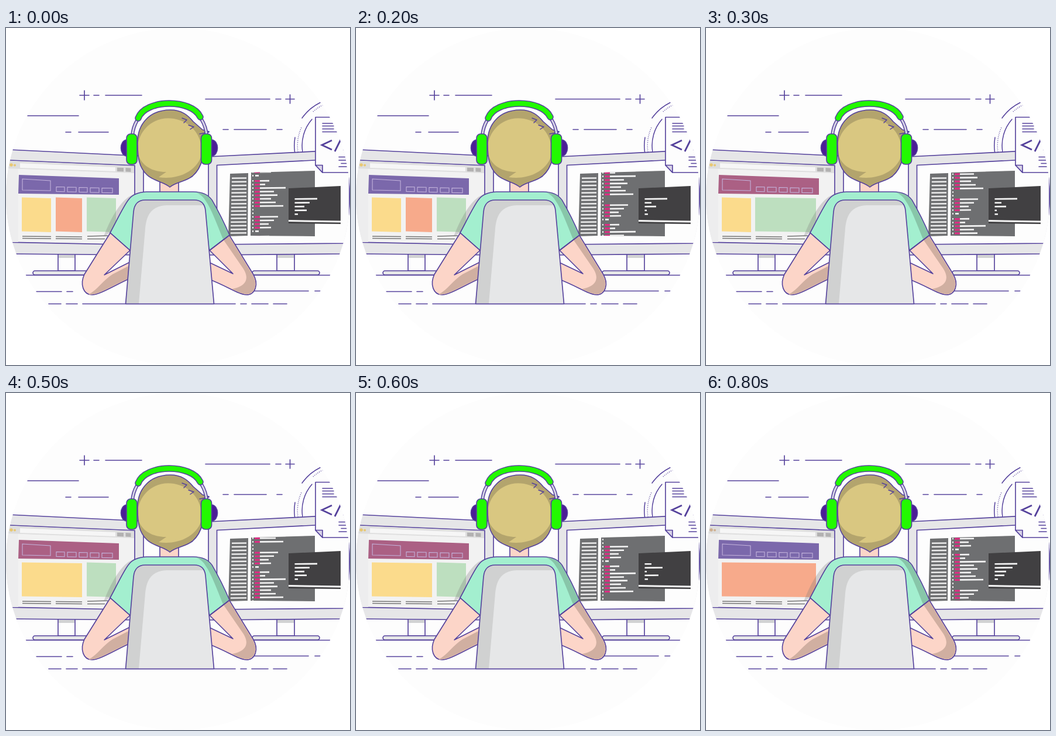
An HTML page that plays this animation: 588x576 px, repeating every 0.9 s.

```html
<!DOCTYPE html>
<html lang="en">
<head>
<meta charset="utf-8">
<title>Coding at two screens</title>
<style>
html, body { margin: 0; width: 100%; height: 100%; overflow: hidden; background: #fff; }
svg { display: block; width: 588px; height: 576px; }
.ink { stroke: #55429c; stroke-width: 1.65; stroke-linejoin: round; stroke-linecap: round; }
.open { fill: none; }
</style>
</head>
<body>
<svg viewBox="0 0 588 576">
  <defs>
    <path id="hair" d="M225 200C223 162 248 140 281 140C300 140 311 149 320 160L336 174L347 177L338 184C339 214 337 237 319 253C307 263 290 263 280 272C271 263 252 262 241 251C227 238 225 220 225 200Z"/>
    <path id="chair" d="M204.500 471.500L218 314Q220 294 238 294H322Q339 294 341 312L355.500 471.500Z"/>
    <path id="wires" d="M224 158Q217 170 216 184M334 156Q342 169 343 184"/>
    <path id="band" d="M226 154C238 121 318 121 332 152"/>
    <clipPath id="stage"><ellipse cx="294" cy="288" rx="294" ry="288"/></clipPath>
    <clipPath id="editor"><path d="M419 247L528 244V356L418 355Z"/></clipPath>
    <clipPath id="head"><use href="#hair"/></clipPath>
  </defs>
  <g clip-path="url(#stage)">
    <rect width="588" height="576" fill="#fdfdfd"/>

    <!-- background dashes -->
    <path class="ink open" d="M126 115h16M134 107v16M150 115h9M170 115h62M341 121.500h110M461 121.500h9M478 121.500h15M485.500 114v15
      M37 150h87M102 178h9M124 178h51M371 173.500h9M390 173.500h55M463 173.500h9
      M34 422.500h106M420 422.500h134M52 450.500h43M104 450.500h10M424 449.500h93M528 449.500h9
      M73 471.500h21M103 471.500h19M131 471.500h261M401 471.500h10M420 471.500h28M457 471.500h23"/>

    <!-- dial behind the document -->
    <g class="ink open" style="stroke-width:1.500">
      <path d="M506 154A82 82 0 0 1 537 127.500M507 212A68 68 0 0 1 523 156M493.500 212A82 82 0 0 1 494 187"/>
      <path d="M525 143A76 76 0 0 1 543 131M499 212A76 76 0 0 1 505 170" stroke-dasharray="1 2.200" stroke-linecap="butt"/>
    </g>

    <!-- left monitor -->
    <g class="ink">
      <path d="M89 386h29v29h-29z" fill="#fdfdfd"/>
      <rect x="46" y="415" width="99" height="7" rx="3.500" fill="#e6e7e8"/>
      <path d="M-5 207.500L235 219V388L-5 386Z" fill="#e6e6e8"/>
      <path d="M-5 225.500L220 235V370.500L-5 366Z" fill="#f2f2f2"/>
    </g>
    <path d="M90 388h27v5h-27z" fill="#d1d2d3"/>
    <path d="M0 227L21 228V366H0Z" fill="#ededee"/>
    <path d="M0 227L219 236V248L0 240Z" fill="#dedede"/>
    <path d="M24 231L187 238V245L24 239Z" fill="#f6f6f6"/>
    <path d="M190 238.500l11 .5v6.500l-11-.5zM204.500 239l9 .4v6.500l-9-.4z" fill="#b2b1b1"/>
    <g id="tabs"><circle cx="9" cy="234" r="2.800"/><circle cx="15" cy="234.500" r="2"/></g>
    <path id="banner" d="M22 251L193 257V285L21 283Z"/>
    <path d="M28 258L76 261V278L28 277ZM86 271.500l14 .3v8l-14-.4zM105 272l15 .3v8l-15-.4zM125 272.500l14 .3v8l-14-.4zM144 273l15 .3v8l-15-.4zM164 273.500l18 .3v8l-18-.4z"
      fill="none" stroke="#c4b3dc" stroke-width="1.100"/>
    <g id="cards"></g>
    <path d="M28 356l49 .5M28 359.500l49 .5M85 356.500l45 .5M85 360l45 .5M139 356l35-1M139 360.500h30" stroke="#777" stroke-width="1.500"/>

    <!-- right monitor -->
    <g class="ink">
      <path d="M463 386h30v29h-30z" fill="#fdfdfd"/>
      <rect x="421" y="415" width="115" height="7" rx="3.500" fill="#e6e7e8"/>
      <path d="M346 220L587 208V386L346 388Z" fill="#e6e6e8"/>
      <path d="M360.500 234.500L587 223V368L360.500 370Z" fill="#fdfdfd"/>
    </g>
    <path d="M464 388h28v5h-28z" fill="#d1d2d3"/>
    <path d="M383 249L414 248L413 355L380 356ZM419 247L528 244V356L418 355Z" fill="#6e6f71"/>
    <g id="sidebar" fill="#ececec"></g>
    <g clip-path="url(#editor)"><g id="code"></g></g>
    <path d="M483 274L572 270V335L483 334Z" fill="#414042"/>
    <path d="M483 329.500L572 331" stroke="#f5f5f5" stroke-width="3"/>
    <g id="terminal" fill="#f5f5f5"></g>

    <!-- document -->
    <g class="ink">
      <path d="M529 152.500H610V247H541L529 234.500Z" fill="#fdfdfd"/>
      <path d="M529 234.500H541V247Z" fill="#d9d4e8"/>
      <path class="open" style="stroke-width:1.500" d="M541 163h19M541 167.500h19M541 172.500h19M541 177.500h25M569 220.500h12M569 226h12M573 231.500h9M569 237h13"/>
      <path class="open" style="stroke-width:2.800;stroke-linecap:butt;stroke-linejoin:miter" d="M557 192L540 200L557 208M562 211L572.500 190"/>
    </g>

    <!-- person -->
    <path d="M167 356Q183 314 203 294Q215 282 235 281L205 302L178 350Z" fill="#777" opacity=".28"/>
    <path class="ink" d="M263 258H295V284H263Z" fill="#fcd5c8"/>

    <g class="ink" fill="#fcd5c8">
      <path d="M179 349L134 421C126 438 132 456 147 456C160 456 185 440 214 427V399L168 422L213 379Z"/>
      <path d="M381 353L422 420C433 438 426 456 411 456C398 456 378 441 346 429V400L388 420L347 379Z"/>
    </g>
    <path d="M211 406L182 421C166 431 157 447 141 455.500Q145 456 149 455C160 454 184 440 211 427Z" fill="#d0afa1"/>
    <path d="M371 361L381 355L421 421C432 438 425 455 411 455C402 454 394 450 386 446C409 442 417 430 406 412Z" fill="#d0afa1"/>
    <path class="ink" d="M178 350C190 328 200 306 209 294Q218 281 240 280H320Q342 280 352 294C363 313 373 333 382 354L348 380L330 340H230L212 380Z" fill="#a3efcf"/>
    <path d="M325 281Q342 282 351 294C362 313 372 333 381 354L371 361C360 334 351 309 341 295Q336 286 325 281Z" fill="#88c6a9"/>
    <path class="ink open" d="M178 350L212 380M382 354L348 380"/>

    <use href="#chair" fill="#e6e7e8"/>
    <path d="M205 471L218 314Q220 294 238 294H322Q334 294 338 303H275C248 304 240 320 238 343L227 471Z" fill="#d0d1d1"/>
    <use href="#chair" class="ink open"/>

    <!-- head and headphones -->
    <path class="ink" d="M207 191C193 191 193 219 207 219ZM351 191C365 191 365 219 351 219Z" fill="#4b1e96"/>
    <use href="#hair" fill="#b3a46d"/>
    <path clip-path="url(#head)" d="M224 208C227 168 258 150 287 155C316 160 334 182 335 211C333 238 301 261 261 255L274 246C247 246 228 233 224 208Z" fill="#d9c781"/>
    <use href="#hair" class="ink open"/>
    <path class="ink open" style="stroke-width:1.500" d="M301 154L309 157L304 162M312 166L321 169L315 173M331 181L347 178"/>
    <g fill="none" stroke-linecap="round">
      <use href="#wires" stroke="#55429c" stroke-width="6"/>
      <use href="#wires" stroke="#d8d5e6" stroke-width="3"/>
      <use href="#band" stroke="#55429c" stroke-width="11.500"/>
      <use href="#band" stroke="#22fa00" stroke-width="8.400"/>
    </g>
    <g class="ink" fill="#22fa00">
      <rect x="206" y="181" width="18" height="52" rx="7"/>
      <rect x="333.500" y="181" width="18" height="52" rx="7"/>
    </g>
  </g>
</svg>
<script>
const byId = id => document.getElementById(id);
const bar = (x, y, end, fill, height = 2.6) =>
  `<path d="M${x} ${y}L${end} ${y - (end - x) * 0.01}v${height}L${x} ${y + height}Z"${fill ? ` fill="${fill}"` : ""}/>`;

const STEP = 100, STEPS = 9, SCROLL = 10;
const CODE_PERIOD = 95, CODE_PITCH = 6.15;
const purple = "#7b68ab", plum = "#ab6084";
const yellow = "#fbdb8c", orange = "#f7aa8b", green = "#bddfbf";

// Cards are [left, right, colour].
const pages = [
  { banner: purple, cards: [[27, 77, yellow], [85, 130, orange], [138, 188, green]] },
  { banner: plum, cards: [[27, 77, yellow], [84, 188, green]] },
  { banner: plum, cards: [[27, 130, yellow], [138, 188, green]] },
  { banner: purple, cards: [[27, 188, orange]] }
];
const pageAt = [0, 0, 0, 1, 1, 2, 2, 3, 3];

// Right ends of the five terminal lines.
const prompts = [
  [532, 519, 510, 514, 499],
  [532, 505, 513, 497, 499],
  [505, 524, 497, 517, 499],
  [532, 524, 513, 510, 499]
];
const promptAt = [0, 0, 1, 1, 0, 0, 2, 2, 3];

// Right ends of code rows; 0 is an empty row.
const codeEnds = [450, 443, 478, 458, 464, 453, 461, 474, 0, 0, 465, 458, 449, 453, 0];

function buildCode() {
  let rows = "";
  for (let block = 0; block < 4; block++) {
    codeEnds.forEach((end, i) => {
      const y = block * CODE_PERIOD + i * CODE_PITCH;
      rows += bar(421, y, 423, "#f5f5f5");
      if (end) rows += bar(425, y, 434, "#dd2d83", 3) + bar(434, y, end, "#f5f5f5");
      else if (i === codeEnds.length - 1) rows += bar(426, y, 432, "#f5f5f5");
    });
  }
  byId("code").innerHTML = rows;
}

function buildSidebar() {
  let rows = "";
  for (let i = 0; i < 16; i++) rows += bar(386 - i * 0.15, 255.5 + i * 6.25, 411);
  byId("sidebar").innerHTML = rows;
}

let shown = -1;
function draw(step) {
  const page = pages[pageAt[step]];
  byId("banner").setAttribute("fill", page.banner);
  byId("tabs").setAttribute("fill", step < 7 ? "#e8c873" : "#cfb091");
  byId("cards").innerHTML = page.cards.map(([left, right, fill]) =>
    `<path d="M${left} 289.500L${right} 291V349L${left} 347.500Z" fill="${fill}"/>`).join("");
  byId("terminal").innerHTML = prompts[promptAt[step]]
    .map((end, i) => bar(493.5, 291 + i * 6.5, end)).join("");
  byId("code").setAttribute("transform", `translate(0 ${260 - CODE_PERIOD - step * SCROLL})`);
}

function tick() {
  const step = Math.floor(performance.now() / STEP) % STEPS;
  if (step !== shown) draw(shown = step);
  requestAnimationFrame(tick);
}

buildCode();
buildSidebar();
tick();
</script>
</body>
</html>
```
